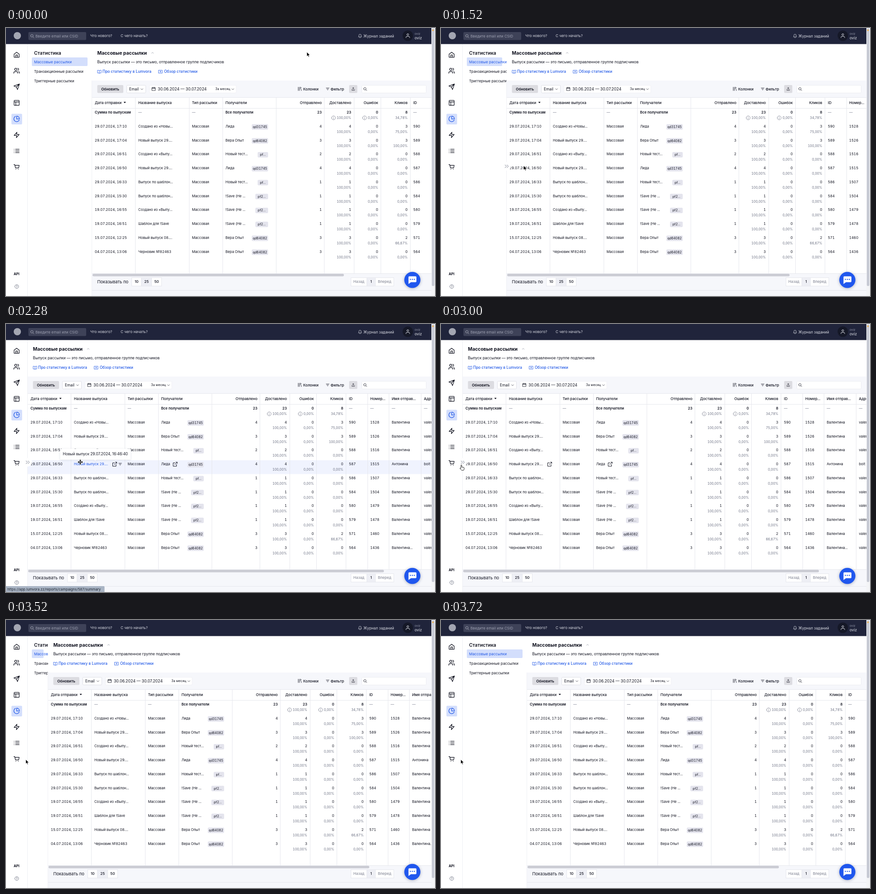
Write an HTML page that moves like this. It is 947 px wide and 592 px high and loops after 4.72 s.

```html
<!DOCTYPE html>
<html lang="ru">
<head>
<meta charset="utf-8">
<style>
html, body { margin: 0; width: 947px; height: 592px; overflow: hidden; background: #fff; }
svg { display: block; font-family: Inter, "Noto Sans", sans-serif; }
text { white-space: pre; }
.cells { font-variant-numeric: tabular-nums; }
.raised { filter: drop-shadow(0 1px 2px #20306028); }
.glow { filter: drop-shadow(0 1px 3px #20306060); }
</style>
</head>
<body>
<svg id="stage" width="947" height="592" viewBox="0 0 947 592"></svg>
<script>
const INK = '#10121f', GRAY = '#656a7d', BLUE = '#1f57e6', LINE = '#e6e7ed', PALE = '#f6f7fb';

// x, y: left (or anchor) and vertical centre of the capitals
const text = (x, y, s, size = 8.2, fill = INK, weight = 400, anchor = 'start', extra = '') =>
  `<text x="${x}" y="${y + size * .36}" font-size="${size}" fill="${fill}" font-weight="${weight}" text-anchor="${anchor}" ${extra}>${s}</text>`;
const box = (x, y, w, h, fill, r = 0, stroke = 'none', extra = '') =>
  `<rect x="${x}" y="${y}" width="${w}" height="${h}" rx="${r}" fill="${fill}" stroke="${stroke}" ${extra}/>`;
const circle = (x, y, r, fill, extra = '') => `<circle cx="${x}" cy="${y}" r="${r}" fill="${fill}" ${extra}/>`;
const line = (x1, y1, x2, y2, c = LINE) => `<path d="M${x1} ${y1}L${x2} ${y2}" stroke="${c}"/>`;
// paths live on a 24 unit grid centred on x, y
const icon = (x, y, d, k = .62, c = INK, w = 2) =>
  `<path transform="translate(${x} ${y}) scale(${k}) translate(-12 -12)" d="${d}" fill="none" stroke="${c}" stroke-width="${w}" stroke-linecap="round" stroke-linejoin="round"/>`;
const group = (id, body, extra = '') => `<g id="${id}" ${extra}>${body}</g>`;

const P = {
  home: 'M3 10l9-7 9 7v11H3zM9 21v-8h6v8',
  users: 'M16 21v-2a4 4 0 0 0-4-4H6a4 4 0 0 0-4 4v2M5 7a4 4 0 1 0 8 0a4 4 0 1 0-8 0M22 21v-2a4 4 0 0 0-3-3.9M16 3.1a4 4 0 0 1 0 7.8',
  send: 'M22 2L11 13M22 2l-7 20-4-9-9-4z',
  layout: 'M5 3h14a2 2 0 0 1 2 2v14a2 2 0 0 1-2 2H5a2 2 0 0 1-2-2V5a2 2 0 0 1 2-2zM3 9h18M9 21V9',
  pie: 'M21.2 15.9A10 10 0 1 1 8 2.8M22 12A10 10 0 0 0 12 2v10z',
  zap: 'M13 2L3 14h9l-1 8 10-12h-9z',
  list: 'M8 6h13M8 12h13M8 18h13M3 6h.1M3 12h.1M3 18h.1',
  cart: 'M2 3h3l3 12h11l2-9H6M9 20h1M17 20h1',
  help: 'M2 12a10 10 0 1 0 20 0a10 10 0 1 0-20 0M9 9a3 3 0 1 1 3 4v1M12 17.5h.1',
  bell: 'M18 8a6 6 0 0 0-12 0c0 7-3 9-3 9h18s-3-2-3-9M10 21h4',
  user: 'M20 21v-2a4 4 0 0 0-4-4H8a4 4 0 0 0-4 4v2M8 7a4 4 0 1 0 8 0a4 4 0 1 0-8 0',
  search: 'M3 10a7 7 0 1 0 14 0a7 7 0 1 0-14 0M15.5 15.5L21 21',
  calendar: 'M3 5h18v16H3zM3 10h18M8 2v5M16 2v5',
  down: 'M5 9l7 7 7-7',
  up: 'M5 15l7-7 7 7',
  book: 'M12 6Q8 3 2 4v15q6-1 10 2 4-3 10-2V4q-6-1-10 2v15',
  video: 'M2 4h20v16H2zM10 9v6l5-3z',
  columns: 'M4 3v18M10 3v18M16 3v10M20 7l-4-4M20 15v6',
  filter: 'M3 6h18M6 12h12M10 18h4',
  upload: 'M4 15v5h16v-5M12 16V4M7 8l5-5 5 5',
  info: 'M2 12a10 10 0 1 0 20 0a10 10 0 1 0-20 0M12 11v6M12 7h.1',
  external: 'M18 13v8H3V6h8M15 3h6v6M10 14L21 3',
  left: 'M11 5l-7 7 7 7M20 5l-7 7 7 7',
  right: 'M4 5l7 7-7 7M13 5l7 7-7 7'
};

const MADE = 'Создано из «', TEST = 'Вера Опыт', NEW = 'Новый тест...', SAVE = '!Save (Не ...';
const TAG_A = 'qd31745', TAG_B = 'qd64082';
// date, title, recipients, tag, sent, clicks, click rate, id, number
const ROWS = [
  ['29.07.2024, 17:10', MADE + 'Новы...', 'Лида', TAG_A, 4, 3, '75,00%', 590, 1528],
  ['29.07.2024, 17:04', 'Новый выпуск 29....', TEST, TAG_B, 3, 3, '100,00%', 589, 1526],
  ['29.07.2024, 16:51', MADE + 'Выпу...', NEW, 'pf...', 2, 0, '0,00%', 588, 1516],
  ['29.07.2024, 16:50', 'Новый выпуск 29....', 'Лида', TAG_A, 4, 0, '0,00%', 587, 1515],
  ['29.07.2024, 16:33', 'Выпуск по шаблон...', NEW, 'pf...', 1, 0, '0,00%', 586, 1507],
  ['29.07.2024, 15:30', 'Выпуск по шаблон...', SAVE, 'pf2...', 1, 0, '0,00%', 584, 1504],
  ['19.07.2024, 16:55', MADE + 'Выпу...', SAVE, 'pf2...', 1, 0, '0,00%', 580, 1479],
  ['19.07.2024, 16:51', 'Шаблон для !Save', SAVE, 'pf2...', 1, 0, '0,00%', 579, 1478],
  ['15.07.2024, 12:25', 'Новый выпуск 08....', TEST, TAG_B, 3, 2, '66,67%', 571, 1460],
  ['04.07.2024, 13:06', 'Черновик №82463', TEST, TAG_B, 3, 0, '0,00%', 564, 1436]
];
const HOVERED = 3, CELL = 7.75, SMALL = 7.1;

function tableRow([date, title, who, tag, sent, clicks, rate, id, number], i) {
  const y = 217 + 30.75 * i;
  const cell = (x, s, anchor, extra) => text(x, y, s, CELL, INK, 400, anchor, extra);
  const sub = (x, s) => text(x, y + 12.2, s, SMALL, GRAY, 400, 'end');
  const w = { 7: 36, 6: 28, 5: 23 }[tag.length];
  const hot = i === HOVERED;
  return cell(196, date) + cell(292, title, 'start', hot ? 'id="link"' : '') + cell(410.5, 'Массовая') + cell(484.5, who) +
    box(578.5 - w, y - 4.5, w, 12, '#e4e4ed', 2) + text(578.5 - w / 2, y + 1.4, tag, SMALL, INK, 400, 'middle') +
    cell(697, sent, 'end') + cell(762, sent, 'end') + cell(821.5, 0, 'end') + cell(886.5, clicks, 'end') +
    sub(762, '100,00%') + sub(821.5, '0,00%') + sub(886.5, rate) +
    cell(899, id) + cell(946, number) +
    cell(993.5, hot ? 'Антонина' : i === 9 ? 'Валентина...' : 'Валентина') +
    cell(1064.5, hot ? 'bolt' : 'valen');
}

function table() {
  const head = (x, s, a) => text(x, 165, s, 8.05, INK, 500, a);
  const sum = (x, s, a) => text(x, 186.3, s, CELL, INK, 600, a);
  const sub = (x, s) => text(x, 198.5, s, SMALL, GRAY, 400, 'end');
  return box(190, 153, 1000, 389, '#fff') +
    group('rowHover', box(190, 301, 1000, 30.5, '#f0f3fe')) +
    [285.5, 404.5, 478.5, 596.5, 702.5, 768.5, 827.5, 892.5, 940.5, 987.5, 1058.5].map(x => line(x, 153, x, 542)).join('') +
    line(190, 153.5, 1190, 153.5) + line(190, 177.5, 1190, 177.5) +
    head(196, 'Дата отправки') + `<path d="M259.7 163h5l-2.5 3.2z" fill="${INK}"/>` +
    head(292, 'Название выпуска') + head(410.5, 'Тип рассылки') + head(484.5, 'Получатели') +
    head(697, 'Отправлено', 'end') + head(762, 'Доставлено', 'end') + head(821.5, 'Ошибок', 'end') + head(886.5, 'Кликов', 'end') +
    head(899, 'ID') + head(946, 'Номер...') + head(993.5, 'Имя отправ...') + head(1064.5, 'Адрес') +
    sum(196, 'Сумма по выпускам') + sum(484.5, 'Все получатели') +
    [292, 410.5, 899, 946, 993.5, 1064.5].map(x => text(x, 186.3, '—', CELL, GRAY)).join('') +
    sum(697, 23, 'end') + sum(762, 23, 'end') + sum(821.5, 0, 'end') + sum(886.5, 8, 'end') +
    sub(762, '100,00%') + sub(821.5, '0,00%') + sub(886.5, '34,78%') +
    [723, 791.5].map(x => icon(x, 198.5, P.info, .43, GRAY, 1.6)).join('') +
    ROWS.map(tableRow).join('') +
    group('openIcons', icon(382, 309.7, P.external, .5) + icon(515.5, 309.7, P.external, .5)) +
    group('filterIcon', icon(394, 309.5, P.filter, .36));
}

function pager(edges, labels, active, color) {
  return labels.map((s, i) => {
    const x = edges[i], w = edges[i + 1] - x, on = i === active;
    return box(x, 551.5, w, 18.5, on ? '#eeeff5' : '#fff', 0, LINE) +
      text(x + w / 2, 560.5, s, 8.1, on ? INK : color, 500, 'middle');
  }).join('');
}

const panel =
  box(190, 35, 1000, 81, '#fff') + box(190, 116, 1000, 37, PALE) + box(190, 542, 1000, 50, PALE) +
  text(201.5, 55.3, 'Массовые рассылки', 10.4, INK, 700) + icon(323.5, 55, P.up, .3, GRAY) +
  text(201.5, 74.8, 'Выпуск рассылки — это письмо, отправленное группе подписчиков', 8.32) +
  icon(206, 96.5, P.book, .4, BLUE) + text(213, 96.3, 'Про статистику в Lumvora', 8.3, BLUE, 500) +
  icon(341, 96.5, P.video, .4, BLUE) + text(349, 96.3, 'Обзор статистики', 8.3, BLUE, 500) +
  box(201.5, 126, 57.5, 17.5, '#dcdce1', 2) + text(230.2, 134.7, 'Обновить', 8.2, INK, 600, 'middle') +
  box(266.5, 126.5, 42, 17, '#fff', 2, '#dfe0e7') + text(272, 134.7, 'Email', 8.3) + icon(300, 135, P.down, .33) +
  box(316.5, 126.5, 191.5, 17, '#fff', 2, '#f0f0f5') + icon(326, 134.5, P.calendar, .4) +
  text(335, 134.7, '30.06.2024 — 30.07.2024', 8.75) + text(462, 134.7, 'За месяц', 7.25) + icon(500.7, 135, P.down, .33) +
  group('cells', table(), 'class="cells"') +
  line(190, 542.5, 1190, 542.5) + line(190, 579.5, 1190, 579.5) + line(189.5, 116, 189.5, 592, '#eff0f5') +
  text(201.5, 560.5, 'Показывать по', 9.4) + pager([277.5, 299, 321.5, 343.5], [10, 25, 50], 1, INK);

const tools =
  icon(648.5, 134.5, P.columns, .42) + text(656, 134.7, 'Колонки', 8.1, INK, 500) +
  icon(710, 134.5, P.filter, .36) + text(716.5, 134.7, 'Фильтр', 8.1, INK, 500) +
  box(757.5, 126, 18, 17.5, '#dcdce1', 2) + icon(766.5, 134.7, P.upload, .36) +
  box(785.5, 126.5, 142, 17, '#fff', 2, '#ecedf2') + icon(793, 135, P.search, .38) +
  pager([761.5, 796.5, 815.5, 856], ['Назад', '1', 'Вперед'], 1, '#8b8e9c') +
  circle(897, 556.5, 17.8, '#2057ee', 'class="glow"') +
  '<path d="M890 548.5h14q2 0 2 2v9q0 2-2 2h-10l-5.5 4v-15q0-2 1.5-2z" fill="#fff"/>' +
  [892.7, 897, 901.3].map(x => circle(x, 555.2, 1.2, '#2057ee')).join('');

const submenu =
  text(62, 55.3, 'Статистика', 10.4, INK, 600) +
  box(57, 65, 123, 19, '#d3defc', 2, 'none', 'id="active"') +
  text(62, 74.7, 'Массовые рассылки', 8.2, BLUE) +
  text(62, 96, 'Транзакционные рассылки', 8.2) + text(62, 117.2, 'Триггерные рассылки', 8.2);

const sidebar =
  box(0, 35, 47, 557, '#fff') + line(47.5, 35, 47.5, 592, '#eeeff3') + box(12, 189.5, 23.5, 23.5, '#d3defc', 2) +
  ['home', 'users', 'send', 'layout', 'pie', 'zap', 'list', 'cart']
    .map((n, i) => icon(23.5, 59 + 35.45 * i, P[n], .62, n === 'pie' ? BLUE : INK)).join('') +
  text(23.3, 543, 'API', 7.4, INK, 700, 'middle') + icon(23.7, 571, P.help, .42, GRAY);

const header =
  box(0, 0, 939, 35.5, '#20243b') + circle(25, 17, 8, '#a3a6b2') +
  box(49.5, 9, 127.5, 17.5, '#3e4258', 2) + icon(58, 18, P.search, .4, '#b4b7c4') +
  text(65, 17.7, 'Введите email или CSID', 8.2, '#9c9fb0') +
  text(186, 17.5, 'Что нового?', 8.2, '#d9dbe3') + text(253, 17.5, 'С чего начать?', 8.2, '#d9dbe3') +
  icon(781.5, 17.7, P.bell, .4, '#d9dbe3') + text(789, 17.7, 'Журнал заданий', 8.3, '#d9dbe3') +
  circle(887, 17, 11.5, '#151827') + icon(887, 17, P.user, .5, '#d9dbe3') +
  text(902, 12.3, 'oviz', 6.5, '#8f93a5') + text(902, 21.7, 'oviz', 8.4, '#e4e6ec');

const scrollbar = box(939, 0, 8, 592, '#f3f4f6') + box(940, 1, 5.5, 569, '#c6c9d3', 2.7) + circle(942.5, 5, 1.7, '#f0a93c');

const HAND = 'M3.2 7V1.2a1 1 0 0 1 2 0V5l4 .8q1.3.3 1.2 1.6l-.4 3.2q-.3 1.6-1.6 1.6H5.4q-.9 0-1.5-.8L.8 7.8q.6-1.3 2.4 0z';
const CROSS = 'M0-4.5V4.5M-4.5 0H4.5M-1.5-3L0-4.8 1.5-3M-1.5 3L0 4.8 1.5 3M-3-1.5L-4.8 0-3 1.5M3-1.5L4.8 0 3 1.5';
const cursor =
  group('arrow', '<path d="M0 0v9.7l2.2-2 1.7 3.5 1.6-.7-1.6-3.4h3.1z" fill="#000" stroke="#fff" stroke-width=".8"/>') +
  group('hand', `<path transform="translate(-4.2 0)" d="${HAND}" fill="#fff" stroke="#222"/>`) +
  group('cross', `<path d="${CROSS}" fill="none" stroke="#fff" stroke-width="3"/><path d="${CROSS}" fill="none" stroke="#111" stroke-width="1.3"/>`);

document.getElementById('stage').innerHTML =
  box(0, 0, 947, 592, '#fff') + submenu + group('panel', panel) +
  box(190, 543, 554, 5.5, '#cbccd4', 2.7, 'none', 'id="thumb"') + tools + sidebar + header + scrollbar +
  group('toggle', circle(0, 0, 9.5, '#fff') +
    group('close', icon(0, 0, P.left, .46, GRAY)) + group('open', icon(0, 0, P.right, .46, GRAY))) +
  group('tip', '<path class="raised" d="M122 275.5h150.5q2.5 0 2.5 2.5v19q0 2.5-2.5 2.5H200l-3 2.8-3-2.8H122q-2.5 0-2.5-2.5v-19q0-2.5 2.5-2.5z" fill="#fff"/>' +
    text(125.5, 287.3, 'Новый выпуск 29.07.2024, 16:46:40', 8.3)) +
  group('status', box(-2, 579, 219.5, 15, '#a9b4c4', 2) +
    text(3, 585.8, 'https://app.lumvora.zz/reports/campaigns/587/summary', 7.7, '#1c2430')) +
  group('cursor', cursor);

const el = id => document.getElementById(id);
const show = (id, on) => el(id).setAttribute('opacity', +on);
const move = (id, x, y) => el(id).setAttribute('transform', `translate(${x} ${y})`);
const smooth = (t, a, b) => {
  const u = Math.min(1, Math.max(0, (t - a) / (b - a)));
  return u * u * (3 - 2 * u);
};

// time, x, y of the pointer after its first sweep
const STOPS = [[560, 178.5, 237], [600, 178.5, 238], [880, 184, 304], [1320, 184, 304], [1360, 182.5, 304], [2240, 182.5, 304],
  [2280, 164, 305], [2800, 62, 305], [3000, 45, 311], [3080, 45, 311], [3360, 43.5, 308]];

function pointer(t) {
  if (t < 560) {
    const u = smooth(t, 0, 560), v = 1 - u;
    const bend = (a, b, c) => a * v * v + 2 * b * u * v + c * u * u;
    return [bend(664, 420, 178.5), bend(53, -60, 237)];
  }
  const i = STOPS.findIndex(s => s[0] > t);
  if (i < 0) return STOPS.at(-1).slice(1);
  const [t0, x0, y0] = STOPS[i - 1], [t1, x1, y1] = STOPS[i], u = smooth(t, t0, t1);
  return [x0 + (x1 - x0) * u, y0 + (y1 - y0) * u];
}

function draw(now) {
  const t = Math.floor(now % 4720 / 40) * 40;
  const within = (a, b) => t >= a && t < b;
  const left = 190 - 142 * (smooth(t, 1400, 1720) - smooth(t, 3400, 3720));
  const view = 939 - left;

  move('panel', left - 190, 0);
  el('active').setAttribute('width', Math.max(0, left - 67));
  el('thumb').setAttribute('x', left + 1);
  el('thumb').setAttribute('width', view * view / 1011);

  move('toggle', left, 305.5);
  show('toggle', within(480, 3360));
  show('close', t < 1360);
  show('open', t >= 1360);

  show('rowHover', within(1760, 2880));
  show('filterIcon', within(1760, 2880));
  show('openIcons', within(1760, 3120));
  show('status', within(1800, 2880));
  show('tip', within(2280, 2440));
  el('link').setAttribute('fill', within(1760, 2480) ? BLUE : INK);

  const cross = within(2280, 2480);
  const hand = within(800, 1360) || within(1760, 2280) || within(2880, 3320);
  move('cursor', ...pointer(t));
  show('cross', cross);
  show('hand', hand);
  show('arrow', !cross && !hand);
}

let start;
function loop(now) {
  start ??= now;
  draw(now - start);
  requestAnimationFrame(loop);
}
requestAnimationFrame(loop);
</script>
</body>
</html>
```
